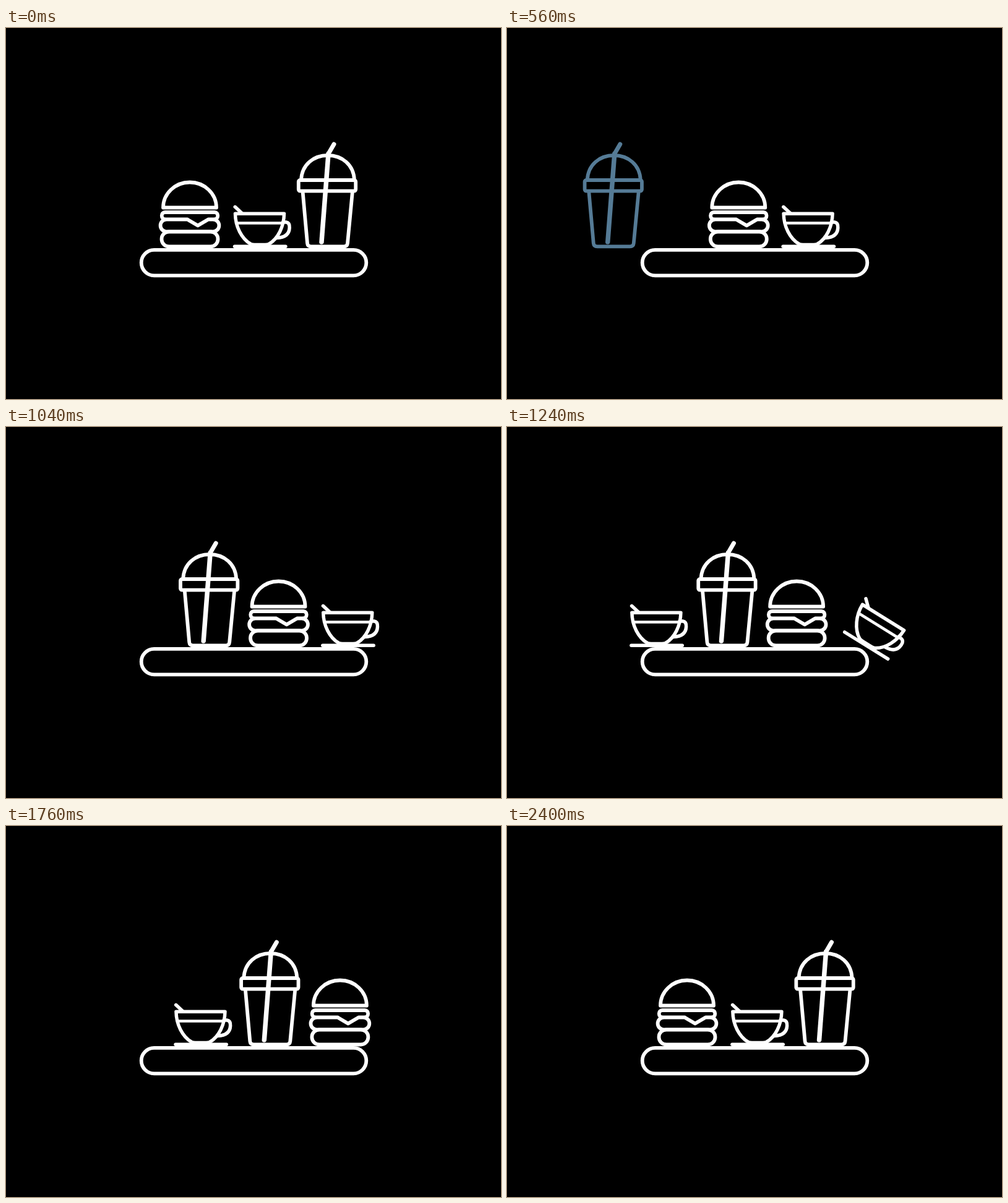
An HTML page with a canvas for the animation above (2.44 s loop, 800 px wide and 600 px high).

```html
<!DOCTYPE html>
<html lang="en">
<head>
<meta charset="utf-8">
<title>Snack shelf</title>
<style>
html, body { margin: 0; width: 100%; height: 100%; overflow: hidden; background: #000; }
canvas { display: block; }
</style>
</head>
<body>
<canvas id="stage" width="800" height="600"></canvas>
<script>
const ctx = document.getElementById('stage').getContext('2d');
const LOOP = 2440, STEP = 40, GROUND = 354, FADE = 200, STROKE = 5.8;
const TILT_RATE = 0.265 * Math.PI / 180;

function line(path, width = STROKE) {
  ctx.lineWidth = width;
  ctx.stroke(new Path2D(path));
}

function box(x, y, w, h, r) {
  ctx.lineWidth = STROKE;
  ctx.beginPath();
  ctx.roundRect(x, y, w, h, r);
  ctx.stroke();
}

// Items are drawn with their base centre at 0,0.
function burger() {
  line('M-43 -63.5A43 41 0 0 1 43 -63.5Z');
  line('M-40 -44.5C-47 -45 -47 -56 -40 -56H40C47 -56 47 -45 40 -44.5');
  line('M-4 -44.5H-37.5A9.9 9.9 0 0 0 -37.5 -24.7H37.5A9.9 9.9 0 0 0 37.5 -44.5H30L13 -34.5L-4 -44.5');
  box(-45.5, -24.7, 91, 24.2, 12);
}

function cup() {
  line('M-41.2 -0.7H41.2', 5.4);
  line('M-40.2 -53.7H38.8C38.5 -33 29 -13 14 -4.5Q12 -3.5 8 -3.5H-9Q-13 -3.5 -15 -4.5C-30 -13 -40 -33 -40.2 -53.7Z', 5.5);
  line('M-37 -38.5H36', 4.5);
  line('M37 -40H42Q48 -39 47.5 -31C47 -20 39 -15 27 -14.5', 5.5);
  line('M-40.5 -64.7L-29.5 -54.5', 5.5);
}

function drink() {
  box(-46.2, -108, 92.4, 17.6, 2.5);
  line('M-42 -108C-41 -133 -22 -148 1 -148C24 -148 43 -133 44 -108');
  line('M-39.5 -90L-32 -6Q-31.5 -0.6 -26 -0.6H27Q32.5 -0.6 33 -6L41 -90');
  line('M11 -166L2 -150.5', 7);
  line('M2 -150.5L-9 -8', 7.5);
}

// home: place at loop start; speeds in px per ms; times in ms.
const items = [
  { draw: burger, home: 297, speed: 0.138, tilt: 1946, gone: 2080,
    enter: 1880, inSpeed: 0.15, lag: 0, settle: 200, power: 2 },
  { draw: cup, home: 410.7, speed: 0.1368, tilt: 1120, gone: 1280,
    enter: 1040, inSpeed: 0.1405, lag: 84, settle: 200, power: 2 },
  { draw: drink, home: 519, speed: 0.1375, tilt: 320, gone: 520,
    enter: 480, inSpeed: 0.1363, lag: 204, settle: 280, power: 2.4 }
];

function place(item, x, angle, light) {
  const channel = power => Math.round(255 * light ** power);
  ctx.save();
  ctx.translate(x, GROUND);
  ctx.rotate(angle);
  ctx.strokeStyle = `rgb(${channel(1.2)},${channel(0.8)},${channel(0.58)})`;
  item.draw();
  ctx.restore();
}

function arrive(item, t) {
  if (t <= item.enter) return;
  const age = t - item.enter;
  const left = Math.max(0, 1 - age / item.settle);
  const x = item.home - item.inSpeed * (LOOP - t) - item.lag * left ** item.power;
  place(item, x, 0, Math.min(1, age / FADE));
}

function leave(item, t) {
  if (t >= item.gone) return;
  place(item, item.home + item.speed * t, Math.max(0, t - item.tilt) * TILT_RATE, 1);
}

function render(now) {
  const t = Math.floor((now % LOOP) / STEP) * STEP;
  ctx.fillStyle = '#000';
  ctx.fillRect(0, 0, 800, 600);
  ctx.lineCap = ctx.lineJoin = 'round';
  items.forEach(item => arrive(item, t));
  items.forEach(item => leave(item, t));
  ctx.strokeStyle = '#fff';
  box(218.7, 358.9, 363.6, 41.4, 20.7);
}

let start;
function tick(now) {
  start ??= now;
  render(now - start);
  requestAnimationFrame(tick);
}
render(0);
requestAnimationFrame(tick);
</script>
</body>
</html>
```
